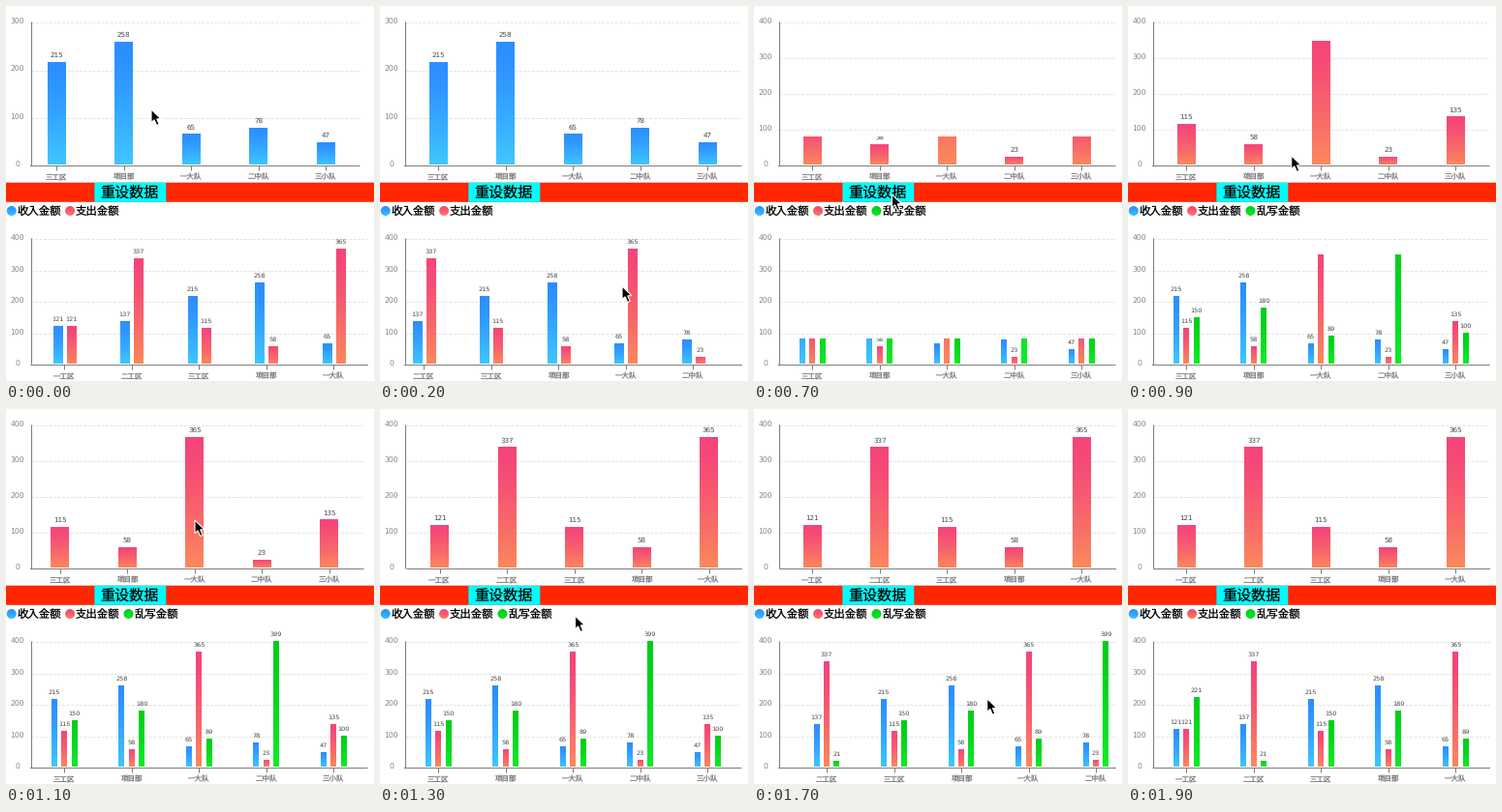
Recreate the animation shown at these times as a matplotlib script. Size 380 by 388 pixels, loop 2 s.

```python
import numpy as np
import matplotlib.pyplot as plt
from matplotlib.animation import FuncAnimation
from matplotlib.patches import Circle, Polygon, Rectangle

plt.rcParams["text.hinting"] = "none"

W, H, DPI = 380, 388, 100
FRAMES, STEP = 20, 100
LEFT, RIGHT = 25, 374
PITCH = 69.5
FAR = 2 * PITCH  # scroll position of the right end
RESET = 700      # time of the button press

NAMES = ["一工区", "二工区", "三工区", "项目部", "一大队", "二中队", "三小队"]
INCOME = [121, 137, 215, 258, 65, 78, 47]
SPENT = [121, 337, 115, 58, 365, 23, 135]
EXTRA = [221, 21, 150, 180, 89, 399, 100]
SERIES = [INCOME, SPENT, EXTRA]
LEGEND = ["收入金额", "支出金额", "乱写金额"]
COLORS = [((44, 142, 255), (64, 200, 255)),
          ((245, 68, 122), (251, 138, 92)),
          ((0, 206, 26), (16, 236, 40))]

# pointer stops: time, x, y
STOPS = [(0, 150, 107), (200, 250, 290), (400, 170, 276), (700, 142.5, 195),
         (1100, 195, 115), (1300, 201.5, 214), (1500, 100, 299), (1800, 290, 300)]
ARROW = np.array([(0, 0), (0, 13.5), (3.1, 10.8), (5.6, 16.5), (8.1, 15.4),
                  (5.7, 9.9), (9.8, 9.6)])

fig = plt.figure(figsize=(W / DPI, H / DPI), dpi=DPI, facecolor="white")
ax = fig.add_axes([0, 0, 1, 1])


def ease(t, t0, t1):
    u = np.clip((t - t0) / (t1 - t0), 0, 1)
    return u * u * (3 - 2 * u)


def bounce(t, peak, size):
    """Rubber-band overshoot around one moment."""
    return size * np.exp(-((t - peak) / 70) ** 2)


def top_scroll(t):
    return (FAR * (1 - ease(t, 1100, 1300)) + bounce(t, 0, 8)
            + bounce(t, 1100, 4.5) - bounce(t, 1300, 1.3))


def low_scroll(t):
    return (FAR * (ease(t, 0, 350) - ease(t, 1500, 1850))
            + bounce(t, 400, 4) + bounce(t, 1500, 11))


def growth(t):
    return np.clip((t - 640) / 300, 0, 1) if t >= RESET else 1


def px(size):
    return size * 72 / DPI


def gray(v):
    return (v / 255,) * 3


def box(x0, y0, x1, y1):
    return Rectangle((x0, y0), x1 - x0, y1 - y0, transform=ax.transData)


def line(xs, ys, color, clip=None, **kw):
    art, = ax.plot(xs, ys, color=color, lw=px(1), solid_capstyle="butt", zorder=2, **kw)
    if clip is not None:
        art.set_clip_path(clip)


def text(x, y, s, size, color, clip=None, cjk=False, ha="center"):
    art = ax.text(x, y + 0.37 * size, s, fontsize=px(size), color=color, ha=ha,
                  va="baseline", zorder=5, clip_on=clip is not None,
                  fontname="Noto Sans CJK JP" if cjk else "DejaVu Sans")
    if clip is not None:
        art.set_clip_path(clip)


def gradient(x0, x1, top, base, pair, clip):
    mix = np.linspace(0, 1, 64)[:, None, None] ** 1.4
    ramp = (np.array(pair[0]) * (1 - mix) + np.array(pair[1]) * mix) / 255
    # one spare pixel all round, so that the clip alone sets the edges
    im = ax.imshow(ramp, extent=(x0 - 1, x1 + 1, base + 1, top - 1), aspect="auto",
                   interpolation="bilinear", zorder=3)
    im.set_clip_path(clip)


def bar(x, width, top, base, cut, pair):
    x0, x1 = x - width / 2, x + width / 2
    left, right = max(x0, LEFT), min(x1, RIGHT)
    if left < right:
        gradient(x0, x1, top, base, pair, box(left, max(top, cut), right, base))


def chart(top, base, limit, shown, scroll, width, gap, size, grown):
    scale = (base - top) / limit
    cut = base - (base - top) * grown if grown < 1 else top - 16
    view = box(LEFT, top - 16, RIGHT, H)
    reveal = box(LEFT, cut, RIGHT, base)
    start = LEFT + 0.5 - scroll
    end = start + PITCH * len(NAMES)

    for v in range(0, limit + 1, 100):
        y = base - v * scale
        text(11.5, y, str(v), 7.6, gray(135))
        if v:
            line([start, end], [round(y) + 0.5] * 2, gray(228), view, dashes=(3, 1.5))
    line([start, end], [base, base], gray(125), view)
    line([LEFT + 0.5] * 2, [top, base], gray(125))

    for i, name in enumerate(NAMES):
        mid = start + PITCH * (i + 0.5)
        if not LEFT - 40 < mid < RIGHT + 40:
            continue
        line([mid, mid], [base, base + 5], gray(125), view)
        text(mid, base + 12, name, 7.5, gray(125), view, cjk=True)
        for k, s in enumerate(shown):
            x = mid + (k - (len(shown) - 1) / 2) * gap
            y = base - SERIES[s][i] * scale
            bar(x, width, y, base - 0.5, cut, COLORS[s])
            text(x, y - 7.5, str(SERIES[s][i]), size, gray(70), reveal)


def banner():
    for x0, x1, color in [(0, W, "#ff2600"), (91.4, 165.3, "#00fdff")]:
        ax.add_patch(Rectangle((x0, 182.7), x1 - x0, 20.1, color=color, lw=0, snap=False))
    text(128, 193, "重设数据", 15.1, "black", cjk=True)


def legend(count):
    for k in range(count):
        x = 5.7 + 60.4 * k
        dot = Circle((x, 212), 5, transform=ax.transData)
        gradient(x - 5, x + 5, 207, 217, COLORS[k], dot)
        text(x + 6.2, 212, LEGEND[k], 11.4, "black", cjk=True, ha="left")


def pointer(t):
    for (t0, *a), (t1, *b) in zip(STOPS, STOPS[1:]):
        if t0 <= t <= t1:
            tip = np.array(a) + (np.array(b) - a) * ease(t, t0, t1)
            ax.add_patch(Polygon(ARROW + tip, fc="black", ec="white",
                                 lw=px(1.1), zorder=9))
            break


def draw(n):
    t = n * STEP
    ax.clear()
    ax.set_xlim(0, W)
    ax.set_ylim(H, 0)
    ax.axis("off")

    banner()
    if t < RESET:
        legend(2)
        chart(16, 164.5, 300, [0], top_scroll(t), 18.6, 0, 7.1, 1)
        chart(240, 370.5, 400, [0, 1], low_scroll(t), 9.3, 14, 6.5, 1)
    else:
        legend(3)
        chart(16, 164.5, 400, [1], top_scroll(t), 18.6, 0, 7.1, growth(t))
        chart(240, 370.5, 400, [0, 1, 2], low_scroll(t), 6, 10.4, 6.5, growth(t))
    pointer(t)
    return []


anim = FuncAnimation(fig, draw, frames=FRAMES, interval=STEP, repeat=True,
                     repeat_delay=0, blit=False)
plt.show()
```
